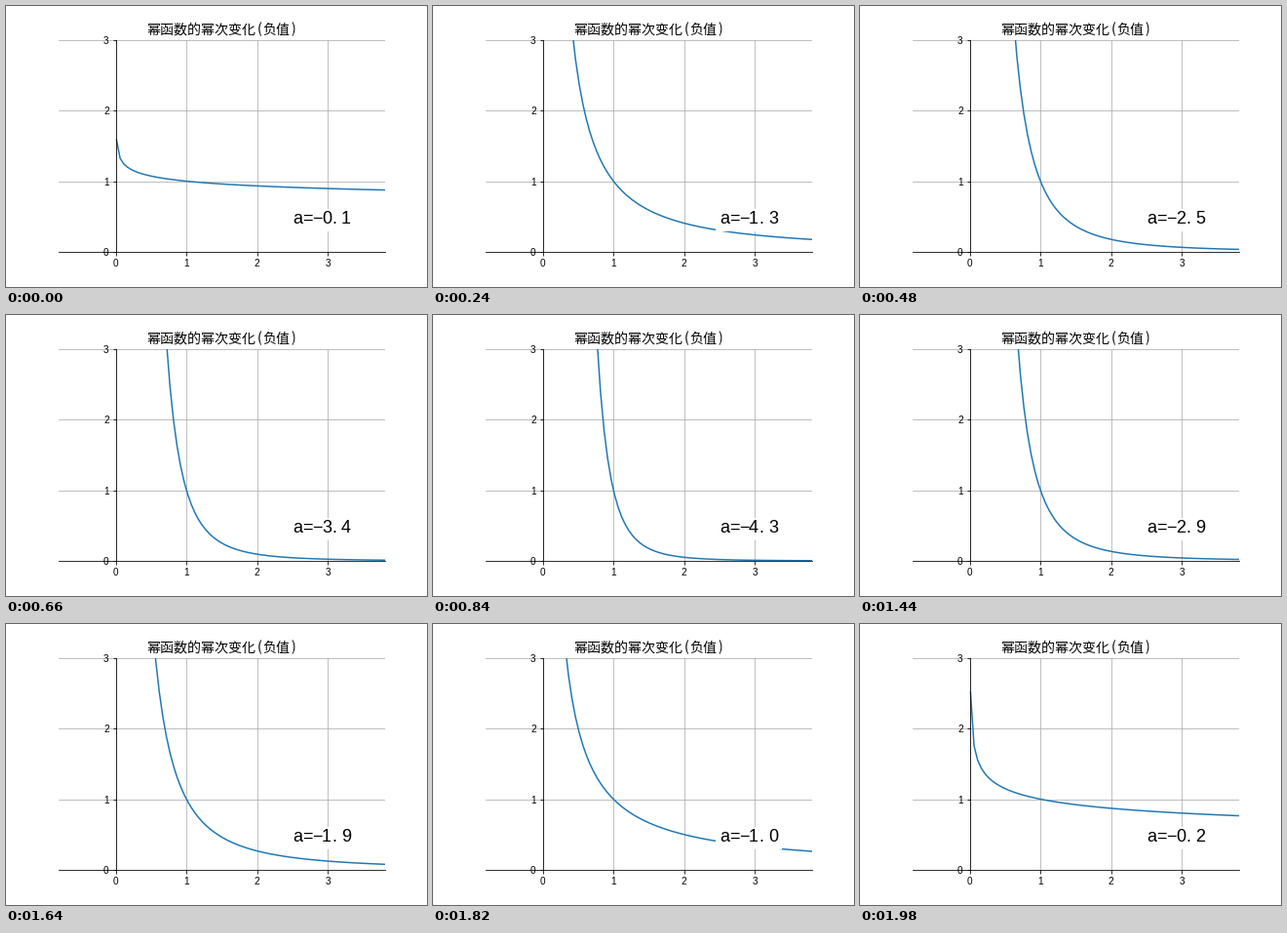
A matplotlib script for the animation above (2000 ms loop, 432 px wide and 288 px high).

```python
import numpy as np
import matplotlib.pyplot as plt
from matplotlib.animation import FuncAnimation
from matplotlib.patches import Rectangle

FRAMES = 100
PX = 3 / (288 * 0.755)           # data units per pixel, same on both axes
HALF_WIDTH = 432 * 0.775 * PX / 2
SANS, CJK = "Liberation Sans", "Noto Sans CJK JP"

fig = plt.figure(figsize=(6, 4), dpi=72, facecolor="white")
ax = fig.add_axes([0.125, 0.125, 0.775, 0.755])
ax.set_xlim(1.5 - HALF_WIDTH, 1.5 + HALF_WIDTH)
ax.set_ylim(0, 3)
ax.set_xticks(range(4))
ax.set_yticks(range(4))
ax.spines[["top", "right"]].set_visible(False)
ax.spines["left"].set_position(("data", 0))
ax.spines["bottom"].set_position(("data", 0))
ax.tick_params(labelsize=10, labelfontfamily=SANS)
ax.grid(True, color="#b0b0b0", linewidth=0.8)

# Title, with the brackets set on half-width cells
for dx, part in [(-77, "幂函数的幂次变化"), (36, "("), (42, "负值"), (71, ")")]:
    ax.annotate(part, (0.5, 1), (dx, 6), xycoords="axes fraction",
                textcoords="offset points", fontsize=14, family=CJK)

x = np.linspace(0.01, 5, 100)
curve, = ax.plot([], [], color="#1f77b4", linewidth=1.5)

# Exponent label: white plate and six characters on a 10 px pitch
ax.add_patch(Rectangle((2.5 - 4 * PX, 0.4 - 8 * PX), 68 * PX, 23 * PX,
                       facecolor="white", linewidth=0, zorder=2.5))
cells = [ax.annotate("", (2.5, 0.4), (10 * i, 0), textcoords="offset points",
                     fontsize=18, family=SANS) for i in range(6)]


def exponent(i):
    """Falls from -0.1 to -5.1 and climbs back, 0.1 per step."""
    return (abs(i - FRAMES // 2) - 51) / 10


def update(i):
    a = exponent(i)
    curve.set_data(x, x ** a)
    label = f"a={a:.1f}".replace("-", "\u2212")
    for cell, char in zip(cells, label):
        cell.set_text(char)
    return [curve, *cells]


anim = FuncAnimation(fig, update, frames=FRAMES, interval=20,
                     repeat=True, repeat_delay=0)
plt.show()
```
